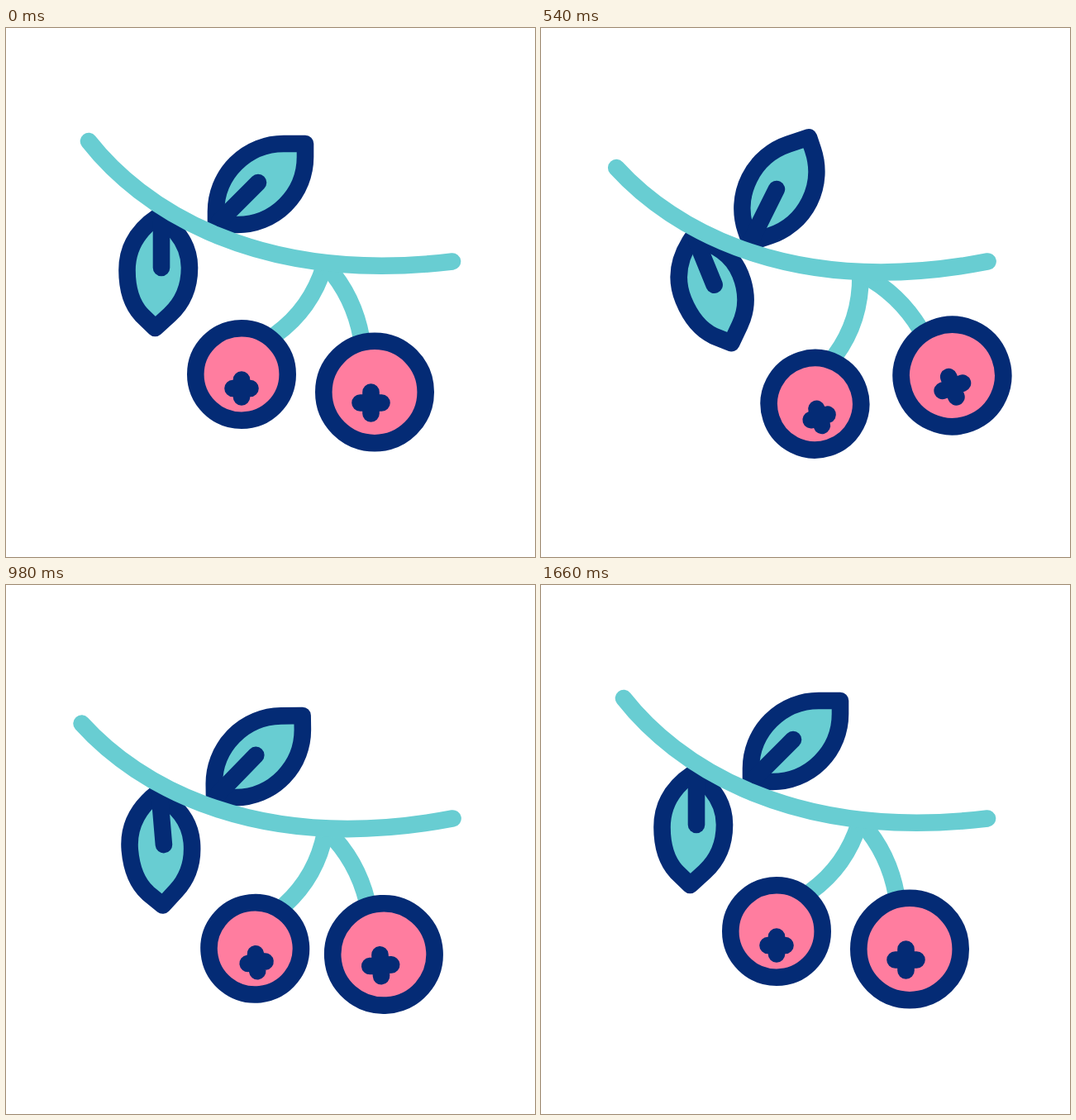
These frames come from a looping animation (640 by 640 pixels, 2.04 s). An HTML page:

```html
<!DOCTYPE html>
<html lang="en">
<head>
<meta charset="utf-8">
<title>Swinging berries</title>
<style>
  html, body { margin: 0; width: 100%; height: 100%; overflow: hidden; background: #fff; }
  svg { display: block; width: 100%; height: 100%; }
  g { fill: none; stroke-width: 20.6; stroke-linecap: round; stroke-linejoin: round; }
  .teal { stroke: #68cdd2; }
  .navy { stroke: #042b75; }
  .leaf { fill: #68cdd2; }
  .berry { fill: #ff7d9f; }
</style>
</head>
<body>
<svg viewBox="0 0 640 640">
  <g id="branch">
    <g id="upperLeaf" class="navy">
      <path class="leaf" d="M362 140H336A82 82 0 0 0 254 222V238H280A82 82 0 0 0 362 156Z"/>
      <path d="M305 187L258 234"/>
    </g>
    <g id="lowerLeaf" class="navy">
      <path class="leaf" d="M180.5 363L164 347Q146.500 328 146.500 293Q146.500 253 184 228Q222 253 222 290Q222 325 198 347Z"/>
      <path d="M188 290V234"/>
    </g>
    <g id="leftBerry" class="navy">
      <path class="teal" d="M385 288Q369 340 326 371"/>
      <circle class="berry" cx="285" cy="419" r="55.7"/>
      <path d="M285 425.5v21M274.5 436h21"/>
    </g>
    <g id="rightBerry" class="navy">
      <path class="teal" d="M388 288Q421 325 430 375"/>
      <circle class="berry" cx="446" cy="440.5" r="61.7"/>
      <path d="M441.5 440.5v26M428.5 453.5h26"/>
    </g>
    <path class="teal" d="M100 137C162 216 300 311 540 282.5"/>
  </g>
</svg>
<script>
  const LOOP = 2040;
  const keys = [0, 400, 680, 960, 1180, 1440];

  // Each part swings about its pivot with its own delay (ms) and peak angles.
  const parts = [
    { id: 'branch', pivot: [540, 274.5], delay: 0, peaks: [-15.3, 6.8, -4.1, 1.95] },
    { id: 'leftBerry', pivot: [386, 288], delay: 72, peaks: [-17.4, 6.7, -3.2, 1.9] },
    { id: 'lowerLeaf', pivot: [188, 226], delay: 118, peaks: [-18.6, 7.4, -4.1, 2] },
    { id: 'rightBerry', pivot: [386, 288], delay: 137, peaks: [-16.6, 7.6, -4.05, 2.2] },
    { id: 'upperLeaf', pivot: [258, 236], delay: 208, peaks: [-15.6, 5.2, -2.9, 1.1] }
  ];
  for (const part of parts) part.node = document.getElementById(part.id);

  const ease = u => u * u * (3 - 2 * u);

  function swing(t, peaks) {
    const end = keys.length - 1;
    if (t <= 0 || t >= keys[end]) return 0;
    const angles = [0, ...peaks, 0];
    const i = keys.findIndex(k => k > t) - 1;
    const u = (t - keys[i]) / (keys[i + 1] - keys[i]);
    return angles[i] + (angles[i + 1] - angles[i]) * ease(u);
  }

  function draw(now) {
    const t = now % LOOP;
    for (const { node, pivot, delay, peaks } of parts) {
      node.setAttribute('transform', `rotate(${swing(t - delay, peaks)} ${pivot})`);
    }
  }

  function tick() {
    draw(performance.now());
    requestAnimationFrame(tick);
  }
  tick();
</script>
</body>
</html>
```
